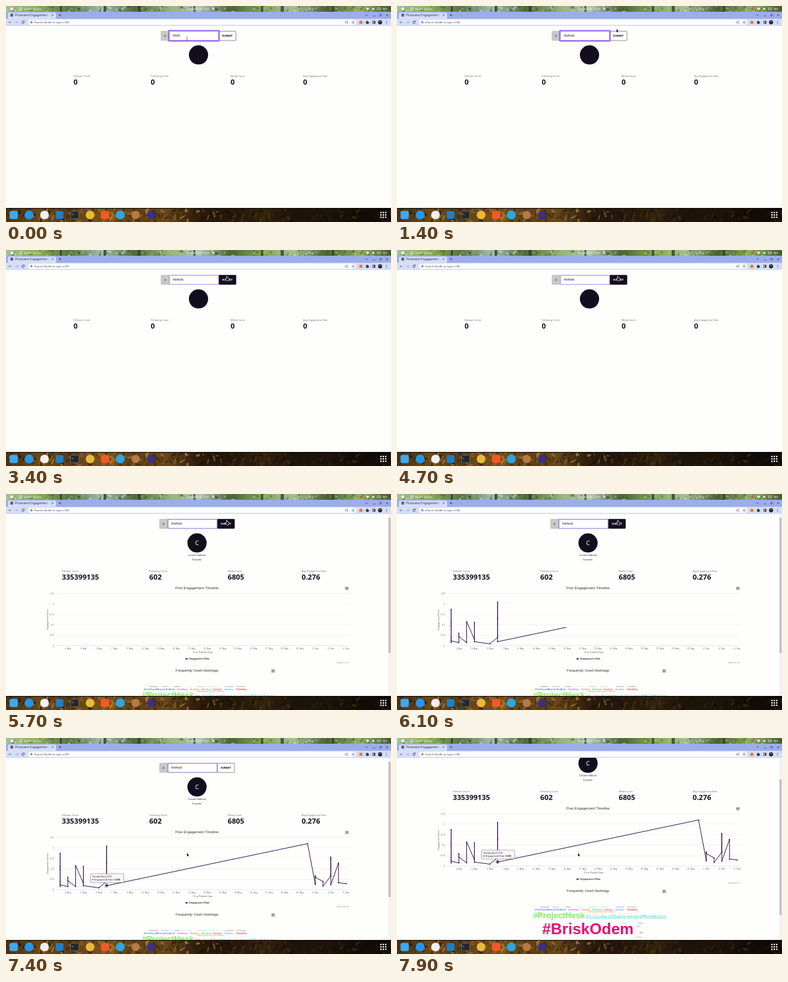
Recreate the animation shown at these times as an HTML page with a canvas. Size 600x338 px, loop 8 s.

```html
<!DOCTYPE html>
<html lang="en">
<head>
<meta charset="utf-8">
<title>Engagement dashboard</title>
<style>
html, body { margin: 0; width: 100%; height: 100%; overflow: hidden; background: #fefefc; }
canvas { display: block; width: 600px; height: 338px; }
</style>
</head>
<body>
<canvas id="stage" width="600" height="338"></canvas>
<script>
const LOOP = 8000, TOP = 31, BOTTOM = 316;
const UI = '"Noto Sans", sans-serif', CHART = '"Liberation Sans", Arial, sans-serif';
const PAPER = '#fefefc', INK = '#120e1e', VIOLET = '#6d28e8', LINE = '#2b0d4c';
const USER = 'thehesk', PERSON = 'Corwin Halbeck';

const stage = document.getElementById('stage');
let ctx = stage.getContext('2d');

const clamp = v => Math.max(0, Math.min(1, v));
const ease = v => (1 - Math.cos(Math.PI * clamp(v))) / 2;

function rect(x, y, w, h, fill, r = 0) {
  ctx.fillStyle = fill;
  ctx.beginPath();
  ctx.roundRect(x, y, w, h, r);
  ctx.fill();
}

function frame(x, y, w, h, color, width = 0.6, r = 0) {
  ctx.strokeStyle = color;
  ctx.lineWidth = width;
  ctx.beginPath();
  ctx.roundRect(x, y, w, h, r);
  ctx.stroke();
}

function dot(x, y, r, fill) {
  ctx.fillStyle = fill;
  ctx.beginPath();
  ctx.arc(x, y, r, 0, Math.PI * 2);
  ctx.fill();
}

function path(points, color, width = 0.6, fill) {
  ctx.beginPath();
  points.forEach(([x, y], i) => i ? ctx.lineTo(x, y) : ctx.moveTo(x, y));
  if (fill) { ctx.closePath(); ctx.fillStyle = fill; }
  ctx.strokeStyle = color;
  ctx.lineWidth = width;
  ctx.stroke();
  if (fill) ctx.fill();
}

// Text is laid out large and scaled down so tiny sizes keep exact advances.
function text(s, x, y, size, color, o = {}) {
  ctx.save();
  ctx.translate(x, y);
  if (o.turn) ctx.rotate(o.turn);
  ctx.scale(0.1, 0.1);
  ctx.font = `${o.weight || 400} ${size * 10}px ${o.font || UI}`;
  ctx.textAlign = o.align || 'left';
  ctx.textBaseline = 'alphabetic';
  ctx.fillStyle = color;
  ctx.fillText(s, 0, 0);
  const w = ctx.measureText(s).width / 10;
  ctx.restore();
  return w;
}

function random(seed) {
  return () => (seed = (seed * 16807) % 2147483647) / 2147483647;
}

// ---- desktop ----

function sweep(y, h, colors) {
  const g = ctx.createLinearGradient(0, 0, 600, 0);
  colors.forEach((c, i) => g.addColorStop(i / (colors.length - 1), c));
  rect(0, y, 600, h, g);
}

function scatter(count, seed, y, h, colors, size, spread) {
  const rnd = random(seed);
  for (let i = 0; i < count; i++) {
    const x = rnd() * 600;
    ctx.globalAlpha = 0.2 + rnd() * 0.4;
    ctx.fillStyle = colors[Math.floor(rnd() * colors.length)];
    ctx.beginPath();
    ctx.ellipse(spread(x), y + rnd() * h, size + rnd() * size, 0.7 + rnd() * 1.2, rnd() * 3, 0, 7);
    ctx.fill();
  }
  ctx.globalAlpha = 1;
}

function wallpaper() {
  sweep(0, 10, ['#9fbf95', '#8fb05f', '#55743f', '#a3bfae', '#4d6a38', '#90af70', '#b3c8b0',
    '#4a6534', '#81a656', '#a6c08e', '#47602f', '#8fae62', '#43592f']);
  scatter(190, 71, 0, 10, ['#2c3f1f', '#b4d08a', '#6f9a45', '#d9e6e2', '#3b5527'], 1.6, x => x);
  ctx.globalAlpha = 0.7;
  [84, 152, 205, 292, 397, 428, 508].forEach((x, i) => rect(x, 0, 3 + i % 3, 9, '#29332a'));
  ctx.globalAlpha = 1;

  sweep(BOTTOM, 22, ['#4a3110', '#6b4816', '#5a3c14', '#7a541c', '#5f4016', '#67461a', '#2a1b0b',
    '#21160a', '#33230f', '#1c1309', '#1d140a', '#120c07', '#0f0a06']);
  scatter(170, 29, BOTTOM + 2, 20, ['#0d0905', '#1a1008', '#c08a35', '#dba94e', '#3c260e'], 3, x => x * 0.56);
  scatter(120, 53, BOTTOM + 2, 20, ['#0b0805', '#5a3f18', '#160f08', '#3a270f'], 3, x => 320 + x * 0.47);
  rect(0, BOTTOM, 600, 1, '#0c0906');
}

function dock() {
  rect(5.5, 320.5, 13, 13, '#3fa9ec', 3);
  dot(36, 327, 7, '#2496ed');
  dot(60, 327, 6.8, '#f2eef3');
  rect(77.5, 321, 12, 12, '#1f7fc4', 1);
  rect(100.5, 321, 13, 12, '#24272b', 1.5);
  frame(100.5, 321, 13, 12, '#8a8d90', 0.7, 1.5);
  text('>_', 102.3, 327, 4, '#fff', { weight: 700 });
  dot(131, 327, 6.8, '#e9b93a');
  rect(148, 320.5, 13, 13, '#f1592a', 3);
  dot(178, 327, 7, '#2ca5e0');
  dot(202, 327, 6.5, '#b47b45');
  dot(226, 327, 6.3, '#3b2f86');
  for (let i = 0; i < 9; i++) {
    rect(583.2 + i % 3 * 3.7, 322 + Math.floor(i / 3) * 3.7, 2.3, 2.3, '#fff', 0.7);
  }
}

function menuBar() {
  dot(9, 4.5, 2.3, '#f4f6f2');
  frame(21.6, 2.8, 3.4, 3.2, '#fff', 0.6);
  text('Zandle Quorix', 28, 6, 4, '#fff', { weight: 500 });
  dot(323, 4.3, 1.4, '#fff');
  dot(554, 4.5, 1.5, '#c9473f');
  path([[561, 3.4], [563.5, 2.6], [566, 3.4], [563.5, 6.4]], '#fff', 0.2, '#fff');
  path([[570.5, 3.7], [572, 3.7], [573.6, 2.4], [573.6, 6.4], [572, 5.2], [570.5, 5.2]], '#fff', 0.2, '#fff');
  frame(578.8, 3, 4.5, 2.8, '#fff', 0.6);
  text('98%', 587, 6, 3.7, '#fff');
}

function browser() {
  const dark = '#30343f', bar = '#d4ddf9';
  rect(0, 9, 600, 12, '#9dade9');
  rect(3, 10.2, 75, 12, bar, 2.5);
  rect(0, 20, 600, 11, bar);
  rect(0, 30.5, 600, 0.6, '#c3cae4');
  rect(6.8, 12, 4.4, 4.6, '#5c6269', 0.7);
  // Gradient stops are in the text's own enlarged units.
  const fade = ctx.createLinearGradient(470, 0, 550, 0);
  fade.addColorStop(0, '#2b303b');
  fade.addColorStop(1, 'rgba(43,48,59,0)');
  text('Pictovane Engagement A', 14, 16.1, 4.8, fade);
  path([[71.2, 12.9], [73.8, 15.5]], dark);
  path([[73.8, 12.9], [71.2, 15.5]], dark);
  path([[82.2, 14.3], [86, 14.3]], dark, 0.7);
  path([[84.1, 12.4], [84.1, 16.2]], dark, 0.7);
  path([[560.4, 13.6], [562, 15.2], [563.6, 13.6]], dark, 0.8);
  path([[572.4, 15.6], [575.4, 15.6]], dark, 0.8);
  frame(582.6, 13, 2.6, 2.6, dark);
  path([[592.6, 13], [595.4, 15.8]], dark, 0.7);
  path([[595.4, 13], [592.6, 15.8]], dark, 0.7);

  [[6.5, -1, '#697084'], [16.5, 1, '#9aa2ba']].forEach(([x, d, c]) => {
    path([[x - 2, 25.5], [x + 2, 25.5]], c, 0.7);
    path([[x + d * 0.3, 23.8], [x + d * 2, 25.5], [x + d * 0.3, 27.2]], c, 0.7);
  });
  ctx.strokeStyle = dark;
  ctx.lineWidth = 0.8;
  ctx.beginPath();
  ctx.arc(26.6, 25.5, 1.8, 0.3, 5.4);
  ctx.stroke();
  path([[27.2, 24.7], [28.8, 24.7], [28.8, 23.1]], dark, 0.3, dark);

  rect(34, 21.3, 512, 8.4, '#fbfcff', 4.2);
  dot(39.6, 25.5, 1.7, '#d9695f');
  text('Search Zandle or type a URL', 44.2, 27, 4.15, '#454a56');
  path([[532.2, 23.9], [529, 25.5], [532.2, 27.1]], '#555b69', 0.5);
  [[532.2, 23.9], [529, 25.5], [532.2, 27.1]].forEach(p => dot(...p, 0.7, '#555b69'));
  const star = [];
  for (let i = 0; i < 11; i++) {
    const a = i * Math.PI / 5 - Math.PI / 2, r = i % 2 ? 1 : 2.3;
    star.push([541 + r * Math.cos(a), 25.6 + r * Math.sin(a)]);
  }
  path(star, '#555b69', 0.5);
  dot(553, 25.5, 2.6, '#e8792b');
  rect(561, 24.2, 3.8, 3.6, dark, 0.5);
  dot(562.8, 24, 0.9, dark);
  dot(565, 26, 0.9, dark);
  frame(571.4, 23.6, 3.8, 3.8, dark, 0.8, 0.5);
  rect(573.3, 23.6, 1.9, 3.8, dark);
  dot(583, 25.5, 3.2, '#392a2c');
  dot(583, 24.6, 1.1, '#8d6655');
  rect(581.4, 26, 3.2, 1.9, '#171418', 0.9);
  [-1.7, 0, 1.7].forEach(d => dot(593, 25.5 + d, 0.55, dark));
}

// ---- page ----

function form(s) {
  ctx.save();
  ctx.translate(s.loaded ? -2.3 : 0, 0);
  rect(241.5, 39.3, 13, 14.8, '#c8c8c9', 1);
  frame(241.5, 39.3, 13, 14.8, '#a9a9ab', 0.4, 1);
  text('@', 247.9, 47.9, 4, '#33313b', { align: 'center' });
  rect(331.5, 39.3, 27, 14.8, s.hover ? INK : PAPER, 1);
  frame(331.7, 39.4, 26.6, 14.6, s.hover ? INK : '#45434d', 0.6, 1);
  text('SUBMIT', 345, 47.9, 4.25, s.hover ? '#fff' : INK, { weight: 700, align: 'center' });
  rect(254.5, 39.3, 77, 14.8, PAPER);
  if (s.focus) {
    frame(253.5, 38.5, 78.6, 16.2, '#b18cf5', 1.4, 0.8);
    ctx.setLineDash([1.2, 1]);
    frame(253.5, 38.5, 78.6, 16.2, VIOLET, 1.5, 0.8);
    ctx.setLineDash([]);
    frame(255, 39.9, 75.8, 13.6, '#8a58e8', 0.5);
  } else {
    frame(254.7, 39.5, 76.6, 14.4, s.loaded ? '#5537bd' : '#8a52e0', 0.7);
  }
  const w = text(s.typed, 260, 48, 4.45, '#1b1922', { weight: 500 });
  if (s.caret) rect(260.2 + w, 43.8, 0.5, 5.4, '#222');
  ctx.restore();
}

function stats(s) {
  const cols = s.loaded ? [87, 223.3, 345.5, 460.7] : [105.2, 225.5, 350, 463];
  const values = s.loaded ? ['335399135', '602', '6805', '0.276'] : ['0', '0', '0', '0'];
  const y = s.loaded ? 121.8 : 110.5;
  ['Follower Count', 'Following Count', 'Media Count', 'Avg Engagement Rate'].forEach((label, i) => {
    text(label, cols[i], y, 3.68, '#6f6d74');
    text(values[i], cols[i], y + 12, 11.25, INK, { weight: 700 });
  });
}

function menuIcon(x, y) {
  for (let i = 0; i < 3; i++) rect(x, y + i * 1.6, 5.2, 0.9, '#555');
}

const POINTS = [
  [0, .08], [0, .87], [0, .55], [0, .48], [0, .2], [0, .12], [1, .08], [1, .3], [1, .22],
  [2, .08], [2, .58], [3, .16], [3, .56], [3, .1], [5, .05], [6, .2], [6, 1.04], [6, .65], [6, .1],
  [32, 1.1], [33, .13], [33, .34], [33, .3], [34, .2], [34, .09], [35, .33], [35, .78], [35, .12],
  [36, .64], [36, .17], [37, .15]
];
const plotX = day => 84.4 + day * 12.05;
const plotY = v => 237.7 - v * 65.8;

function chart(s) {
  const mid = { font: CHART, align: 'center' };
  text('Post Engagement Timeline', 297.7, 149, 5.65, '#333', mid);
  menuIcon(528.6, 145.6);
  for (let v = 0; v <= 1.25; v += 0.25) {
    rect(78, plotY(v) - 0.2, 458, 0.4, v ? '#e4e4e4' : '#ccd6eb');
    text(String(v), 74.8, plotY(v) + 1.2, 3.4, '#666', { font: CHART, align: 'right' });
  }
  for (let day = 1; day <= 37; day += 2) {
    const label = day <= 31 ? `${day}. Aug` : `${day - 31}. Sep`;
    rect(plotX(day) - 0.15, 237.7, 0.3, 2.4, '#ccd6eb');
    text(label, plotX(day), 243, 3.35, '#666', mid);
  }
  text('Engagement Score', 66.2, 196.5, 3.75, '#666', { ...mid, turn: -Math.PI / 2 });
  text('Post Publish Date', 307, 249.4, 3.75, '#666', mid);
  path([[279, 257.9], [284, 257.9]], LINE, 0.8);
  dot(281.5, 257.9, 1.1, LINE);
  text('Engagement Rate', 285.4, 259.2, 3.75, '#333', { font: CHART, weight: 700 });
  text('highcharts.com', 535, 265, 2.8, '#999', { font: CHART, align: 'right' });

  ctx.save();
  ctx.beginPath();
  ctx.rect(78, 150, 458 * s.reveal, 92);
  ctx.clip();
  const pts = POINTS.map(([d, v]) => [plotX(d), plotY(v)]);
  ctx.lineJoin = 'round';
  path(pts, LINE, 0.95);
  pts.forEach(([x, y]) => dot(x, y, 0.9, LINE));
  ctx.restore();
  if (s.tip) tooltip();
}

function tooltip() {
  const x = plotX(6), y = plotY(0.1);
  dot(x, y, 3.3, 'rgba(43,13,76,.25)');
  dot(x, y, 1.5, LINE);
  path([[132, 212.6], [183, 212.6], [183, 226], [x + 2, 226], [x, 228.4], [x - 2, 226], [132, 226], [132, 212.6]],
    LINE, 0.6, 'rgba(247,247,247,.88)');
  text('Saturday, Aug 6, 2022', 134.4, 218, 3.1, '#333', { font: CHART });
  dot(135.5, 221.6, 0.9, LINE);
  const w = text('Engagement Rate: ', 137.8, 222.9, 3.6, '#333', { font: CHART });
  text('0.098', 137.8 + w, 222.9, 3.6, '#333', { font: CHART, weight: 700 });
}

function hashtags() {
  const bold = { font: CHART, weight: 700 };
  text('Frequently Used Hashtags', 297.7, 277.6, 5.65, '#333', { font: CHART, align: 'center' });
  menuIcon(413.6, 274.8);
  [
    [223, '#WarmDays', '#b0366f'], [242, '#SlowTea', '#2f9f6c'], [261, '#OldMap', '#3f7d78'],
    [279.5, '#Sunrise', '#8fe6e2'], [298, '#WideRoad', '#55c8b4'], [317, '#OpenSky', '#79d8e0'],
    [341, '#LateShow', '#8a3bb0'], [358.5, '#GoodEffort', '#2d8a71']
  ].forEach(([x, s, c]) => text(s, x, 302.2, 2.5, c, bold));
  [
    [214.5, '#FindThoseWhoLikeTheWork', '#5b7fe0', 3.45], [266.5, '#SmallSteps', '#c774d8', 2.9],
    [287, '#EarlyStart', '#ef8a72', 2.6], [304, '#MakeItCount', '#58d686', 2.6],
    [322, '#TrueGrind', '#e0559a', 2.6], [340, '#QuietHour', '#5fb0e8', 2.6], [358, '#ThankfulDay', '#d44b4b', 2.6]
  ].forEach(([x, s, c, size]) => text(s, x, 306.6, size, c, bold));
  text('#AlwaysReadyForMore', 297.5, 310, 3.9, '#e3c25a', bold);
  text('#ProjectHesk', 212, 318.8, 12.75, '#7df25c', bold);
  text('#LoudestDancersInTheMoor', 294.3, 319.8, 9.3, '#7ce6dc', bold);
  text('#BriskOdem', 226.3, 343.6, 24.2, '#e60f72', bold);
  text('#Gym', 376, 327.6, 2.6, '#63c98d', bold);
  text('#Rise', 373, 333, 2.6, '#a4a9ee', bold);
  text('#Go', 378, 343.4, 2.6, '#e0605a', bold);
  text('#Team', 373, 350, 2.6, '#e0b85a', bold);
}

function page(s) {
  ctx.save();
  ctx.beginPath();
  ctx.rect(0, TOP, 600, BOTTOM - TOP);
  ctx.clip();
  rect(0, TOP, 600, BOTTOM - TOP, PAPER);
  ctx.save();
  ctx.translate(0, -s.scroll);
  form(s);
  dot(s.loaded ? 297.7 : 300, 76.6, 15, INK);
  stats(s);
  if (s.loaded) {
    text(PERSON[0], 297.7, 80, 9.4, '#fff', { align: 'center' });
    text(PERSON, 297.7, 97.2, 3.75, '#24222c', { align: 'center' });
    text('Founder', 297.7, 103.8, 3.75, '#24222c', { align: 'center' });
    chart(s);
    hashtags();
  }
  ctx.restore();
  if (s.loaded) {
    rect(595.5, TOP, 4.5, BOTTOM - TOP, '#f3f3f4');
    rect(596.2, 37 + s.scroll * 0.75, 3.2, 212, '#bfbfc1');
  }
  ctx.restore();
}

// ---- pointer ----

const at = (x, y, shape) => shape.map(([a, b]) => [x + a, y + b]);

function pointer(s) {
  const [x, y] = s.mouse;
  if (s.hover) {
    path(at(x, y, [[-1.4, -3], [-0.3, -3], [-0.1, -0.8], [2.3, -0.1], [2.4, 1.7], [1.6, 3.4],
      [-1, 3.4], [-2.7, 0.9], [-2.3, 0.2], [-1.3, 0.9], [-1.4, -3]]), '#fff', 1.1, '#16141c');
  } else if (s.overInput) {
    path([[x, y - 2.2], [x, y + 2.2]], '#333', 0.6);
    [-2.3, 2.3].forEach(d => path([[x - 1.1, y + d], [x + 1.1, y + d]], '#333', 0.5));
  } else {
    path(at(x, y, [[0, -2], [0, 2.9], [1.1, 1.9], [1.9, 3.5], [2.7, 3.1], [1.9, 1.6], [3.3, 1.5], [0, -2]]),
      '#fff', 0.7, '#111');
  }
}

function mouseAt(t) {
  if (t < 1400) {
    const k = ease((t - 1000) / 400);
    return [282 + 60 * k, 51 - 13 * k];
  }
  if (t < 6500) {
    const k = ease((t - 1400) / 400);
    return [342 + 3 * k, 38 + 6.5 * k];
  }
  const k = ease((t - 6500) / 900);
  return [345 - 63 * k, 44.5 + 137.5 * k];
}

function stateAt(t) {
  const mouse = mouseAt(t), [x, y] = mouse, loaded = t >= 5700;
  const inRow = y > 39.2 && y < 54;
  return {
    mouse, loaded,
    typed: USER.slice(0, t < 200 ? 4 : t < 400 ? 5 : t < 500 ? 6 : 7),
    caret: t < 1100,
    focus: t < 2000,
    overInput: inRow && x > 254 && x < 331,
    hover: inRow && x >= 331 && x < 358,
    reveal: ease((t - 5660) / 1000),
    tip: loaded && y > 155,
    scroll: 37 * ease((t - 7500) / 400),
    clock: t < 4700 ? '11:24' : '11:25'
  };
}

// Everything that never changes is painted once.
const still = document.createElement('canvas');
still.width = 600;
still.height = 338;
const live = ctx;
ctx = still.getContext('2d');
wallpaper();
menuBar();
browser();
dock();
ctx = live;

function draw(now) {
  const t = Math.floor(now % LOOP / 100) * 100;
  const s = stateAt(t);
  ctx.drawImage(still, 0, 0);
  text('Sun Aug 18  ' + s.clock, 300, 5.8, 3.9, '#fff', { align: 'center', weight: 500 });
  page(s);
  pointer(s);
}

const start = performance.now();
function tick() {
  draw(performance.now() - start);
  requestAnimationFrame(tick);
}
tick();
</script>
</body>
</html>
```
